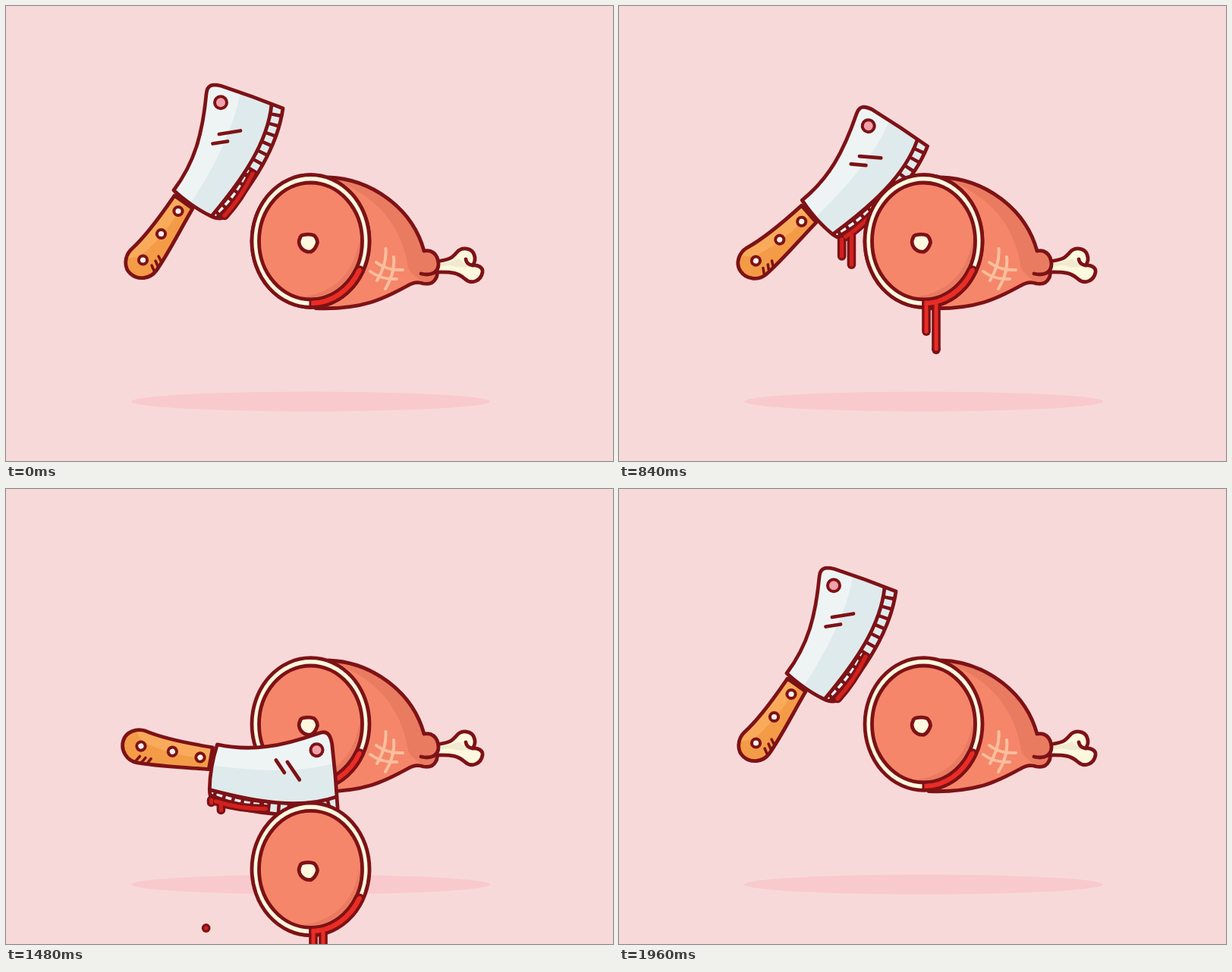
Animation, 800 px wide and 600 px high, one loop 2000 ms. Source, as an HTML page:

```html
<!DOCTYPE html>
<html lang="en">
<head>
<meta charset="utf-8">
<title>Cleaver and ham</title>
<style>
  html, body { margin: 0; width: 100%; height: 100%; overflow: hidden; background: #f8d9d9; }
  svg { display: block; width: 800px; height: 600px; }
  .line { stroke: #7d1216; stroke-width: 4.8; stroke-linecap: round; stroke-linejoin: round; }
  .none { fill: none; }
  .meat { fill: #f5866a; }
  .shade { fill: #e97b61; }
  .ivory { fill: #fdf8de; }
  .dark { stroke: #7d1216; stroke-width: 11.6; fill: none; stroke-linecap: round; }
  .red { stroke: #ea2d25; stroke-width: 5; fill: none; stroke-linecap: round; }
  .deep .red, .red.deep { stroke: #d3211d; }
  .hatch { stroke: #fbbf9d; stroke-width: 4; fill: none; stroke-linecap: round; }
</style>
</head>
<body>
<svg viewBox="0 0 800 600">
  <defs>
    <path id="blade" d="M264 116 C265 105 270 102 284 105.500 Q325 119 365 135 C358 185 326 236 289 277 Q283 283 270 277 Q245 265 221 243 C249 206 259 168 264 116Z"/>
    <clipPath id="bladeClip"><use href="#blade"/></clipPath>
    <path id="handle" d="M222 250 C205 275 185 303 165 321 C156 330 155 345 164 353 C174 362 190 360 198 349 C213 328 228 298 246 267Z"/>
    <clipPath id="handleClip"><use href="#handle"/></clipPath>
    <path id="body" d="M408 398.500 C470 401 500 385 529 369 Q540 362 550 366 Q562 368 566 360 Q571 352 570 340 C569 326 560 321 551 323 C535 265 480 228 425 226 L402 310Z"/>
    <clipPath id="bodyClip"><use href="#body"/></clipPath>
    <g id="faceRed" class="red">
      <path d="M402.500 392 A72.500 82 0 0 0 466 348" stroke-width="6.200" style="stroke-linecap:butt;stroke-width:6.200px"/>
      <path d="M465.800 348.500 l.2 -.5"/>
    </g>
    <g id="face">
      <ellipse class="line ivory" cx="401.500" cy="310" rx="77.500" ry="87.300"/>
      <ellipse class="meat" cx="401.500" cy="310" rx="68" ry="77"/>
      <path class="shade" d="M468.500 288 C465 348 436 380 385 384 L402 387 A68 77 0 0 0 468.500 288Z"/>
      <ellipse class="line none" cx="401.500" cy="310" rx="68" ry="77"/>
      <path class="line ivory" stroke-width="4" d="M391 302 Q400 300 406 302.500 Q410 306 410.500 312 Q408 321 402 324 Q394 325 389 319 Q384 312 387.500 306 Q388 303 391 302Z"/>
      <path class="dark" style="stroke-linecap:butt;stroke-width:14px" d="M399.500 392 A72.500 82 0 0 0 466 348"/>
      <path class="dark" d="M465.500 349 l.5 -1"/>
      <use href="#faceRed"/>
    </g>
    <path id="edgeRed" class="red deep" d="M325 221 C316 240 304 259 288 276.500"/>
  </defs>

  <ellipse cx="401.500" cy="521.500" rx="236.500" ry="13" fill="#f9cacd"/>

  <g id="ham">
    <path class="ivory" d="M565 337 C585 335 588 332 594 325 C601 317 614 319 617 328 C619 333 618 338 615 342 C622 341 629 345 628 351 C626 362 614 368 605 360 C596 352 588 350 565 351Z"/>
    <path fill="#f1ead0" d="M570 339 Q588 338 597 333 Q604 341 615 343 Q598 346 590 343 Q580 341 570 345Z"/>
    <path class="line none" d="M565 337 C585 335 588 332 594 325 C601 317 614 319 617 328 C619 333 618 338 615 342 C622 341 629 345 628 351 C626 362 614 368 605 360 C596 352 588 350 565 351 M615 342 Q607 341 606 334"/>
    <use href="#body" class="meat"/>
    <path class="shade" clip-path="url(#bodyClip)" d="M425 220 Q440 232 452 238 C500 262 523 300 530 345 Q535 357 560 370 L580 370 L580 300 L500 220Z"/>
    <path class="line none" d="M408 398.500 C470 401 500 385 529 369 Q540 362 550 366 Q562 368 566 360 Q569 356 568 351 M425 226 C480 228 535 265 551 323 C560 321 569 326 570 340 C570 352 560 356 547 353"/>
    <path class="hatch" d="M500.500 320 Q502 340 489 362 M511 331 Q513 352 500 373 M488 338 Q502 349 523 348 M480 350 Q495 361 515 360"/>
    <use href="#face"/>
  </g>

  <g id="knife">
    <use href="#handle" fill="#f49b47"/>
    <path clip-path="url(#handleClip)" fill="#f9ab5b" d="M222 245 L238 256 C220 285 197 315 176 330 L150 335Z"/>
    <use href="#handle" class="line none"/>
    <path class="line none" style="stroke-width:3.500px" d="M192 342 L195 349 M197 336 L200 343 M201 330 L204 336"/>
    <g class="line" fill="#fdf3ee" style="stroke-width:4px">
      <circle cx="227" cy="270.500" r="5.600"/>
      <circle cx="204.500" cy="300.500" r="5.600"/>
      <circle cx="180.500" cy="335" r="5.600"/>
    </g>
    <use href="#blade" fill="#dfeaec"/>
    <g clip-path="url(#bladeClip)">
      <path fill="#eef4f4" d="M255 95 L309 112 C299 168 272 215 243 261 L210 250Z"/>
      <path fill="none" stroke="#7d1216" stroke-width="13" stroke-dasharray="4.500 8.800" stroke-dashoffset="-9" d="M357.500 132.500 C351.500 182 319 232 278 279"/>
      <path fill="none" stroke="#7d1216" stroke-width="12" d="M321 222 C309 243 294 262 279 279"/>
      <path fill="none" stroke="#eef4f4" stroke-width="3.600" stroke-dasharray="8 4.500" d="M316 226 C305 244 291 262 274 277"/>
    </g>
    <path class="line none" d="M350 130 C345 180 312 228 271 277"/>
    <use href="#blade" class="line none"/>
    <circle class="line" cx="283" cy="127.300" r="8" fill="#f3a0aa" style="stroke-width:4px"/>
    <path class="line none" d="M281 169 L309 164.500 M272.500 181.500 L292 178.500"/>
    <path class="dark" d="M325 221 C316 240 304 259 288 276.500"/>
    <use href="#edgeRed"/>
  </g>

  <g id="knifeDrips" class="deep">
    <g id="knifeDark"></g>
    <use id="edgeTop" href="#edgeRed"/>
    <g id="knifeRed"></g>
  </g>

  <g id="drops"></g>
  <g id="slice">
    <use href="#face"/>
    <g id="sliceDark"></g>
    <use href="#faceRed"/>
    <g id="sliceRed"></g>
  </g>
</svg>

<script>
const LOOP = 2000, STEP = 40;
const PIVOT = { x: 176, y: 335 };
const SWING_END = 1380, RISE_END = 1960;
const GRAVITY = 0.00127;
const $ = id => document.getElementById(id);

// Downswing keys: time, degrees, degrees per ms
const swing = [
  [0, 0, 0], [320, 1.35, 0.009], [640, 6.5, 0.026],
  [1040, 28, 0.1], [1280, 63.7, 0.13], [SWING_END, 70, 0]
];

function angle(t) {
  if (t >= RISE_END) return 0;
  if (t >= SWING_END) {
    const u = (t - SWING_END) / (RISE_END - SWING_END);
    return 35 * (1 + Math.cos(Math.PI * u));
  }
  const i = swing.findIndex(k => k[0] > t);
  const [t0, a, va] = swing[i - 1], [t1, b, vb] = swing[i];
  const d = t1 - t0, u = (t - t0) / d, w = 1 - u;
  return w * w * (1 + 2 * u) * a + u * u * (3 - 2 * u) * b + d * u * w * (w * va - u * vb);
}

function turn(x, y, deg) {
  const r = deg * Math.PI / 180, c = Math.cos(r), s = Math.sin(r);
  return { x: PIVOT.x + x * c - y * s, y: PIVOT.y + x * s + y * c };
}

const fall = t => t < 1020 ? 0 : 80 * Math.pow((t - 1020) / 260, 1.528);

// A rounded streak: dark outline and red core, possibly in two layers
function streak(darkLayer, redLayer) {
  const make = (parent, cls) => {
    const p = document.createElementNS("http://www.w3.org/2000/svg", "path");
    p.setAttribute("class", cls);
    parent.appendChild(p);
    return p;
  };
  const parts = [make(darkLayer, "dark"), make(redLayer, "red")];
  return (show, x, top, bottom) => parts.forEach(p => {
    p.style.display = show ? "" : "none";
    p.setAttribute("d", `M${x} ${top}V${Math.max(top, bottom - 5.8) + 0.01}`);
  });
}

const sliceDrips = [
  { x: 405, end: t => 393 + 0.05 * t },
  { x: 418, end: t => 398 + 0.085 * t - 0.000016 * t * t }
].map(d => ({ ...d, draw: streak($("sliceDark"), $("sliceRed")) }));

const sliceDrops = [
  { start: 783, base: 455, len: 12 },
  { start: 850, base: 460, len: 31 },
  { start: 1126, base: 474, len: 28, follow: true }
].map(d => ({ ...d, draw: streak($("drops"), $("drops")) }));

const knifeDrips = [
  { x: 108, y: -54, len: t => 0.05 * t - 14, start: 1183, size: 12 },
  { x: 119, y: -63, len: t => 0.06 * t - 5, start: 1126, size: 31 }
].map(d => ({
  ...d,
  drop: streak($("knifeDark"), $("knifeDark")),
  draw: streak($("knifeDark"), $("knifeRed"))
}));

function render(t) {
  const a = angle(t), dy = fall(t);
  const spin = `rotate(${a} ${PIVOT.x} ${PIVOT.y})`;
  $("knife").setAttribute("transform", spin);
  $("edgeTop").setAttribute("transform", spin);
  $("slice").setAttribute("transform", `translate(0 ${dy})`);

  for (const d of sliceDrips) d.draw(d.end(t) > 400, d.x, 391, d.end(t));

  for (const d of sliceDrops) {
    const bottom = d.base + GRAVITY * (t - d.start) ** 2 + (d.follow ? dy : 0);
    d.draw(t > d.start && bottom < 660, 418, bottom - d.len + 5.8, bottom);
  }

  const held = Math.min(t, SWING_END);
  const shrink = Math.max(0, 1 - (t - held) / 120);
  for (const d of knifeDrips) {
    const p = turn(d.x, d.y, a), len = d.len(held) * shrink;
    d.draw(len > 0, p.x, p.y, p.y + len);
    const q = turn(d.x, d.y, angle(held));
    const bottom = q.y + d.len(held) + GRAVITY * (t - d.start) ** 2;
    d.drop(t > d.start && bottom < 660, q.x, bottom - d.size + 5.8, bottom);
  }
}

function tick() {
  render(Math.floor(performance.now() % LOOP / STEP) * STEP);
  requestAnimationFrame(tick);
}
tick();
</script>
</body>
</html>
```
